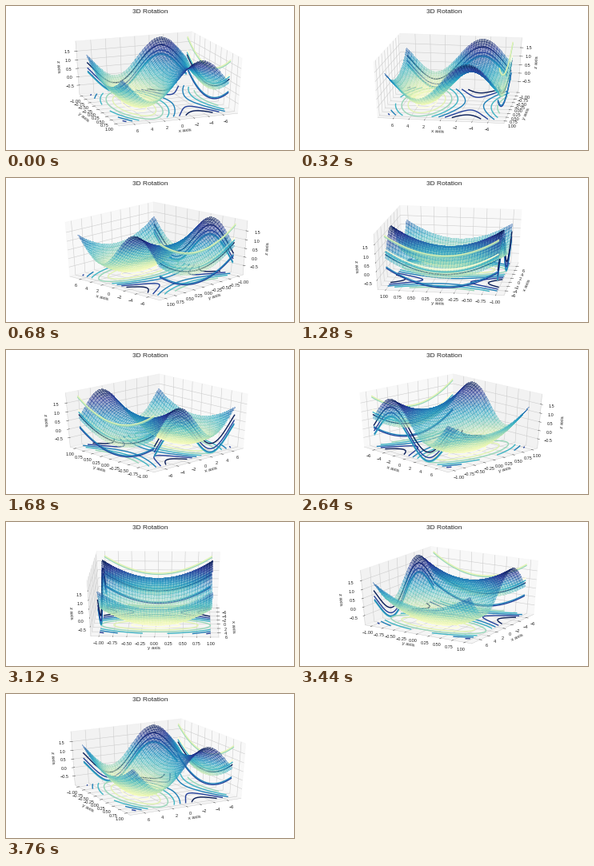
These frames come from a looping animation (360x180 px, 3.84 s). A matplotlib script:

```python
import math

import matplotlib.pyplot as plt
import numpy as np
from matplotlib.animation import FuncAnimation

DPI = 40
FRAMES = 96
STEP = 360 / FRAMES
START = 69.2
INK = "0.15"
CMAP = plt.get_cmap("YlGnBu")

plt.rcParams.update({
    "font.family": "Liberation Sans",
    "text.color": INK,
    "axes.labelcolor": INK,
    "axes.edgecolor": "0.8",
    "axes.labelsize": 11,
    "xtick.labelsize": 10,
    "ytick.labelsize": 10,
    "xtick.color": INK,
    "ytick.color": INK,
    "grid.color": "0.8",
    "grid.linewidth": 1,
})

fig = plt.figure(figsize=(360 / DPI, 180 / DPI), dpi=DPI)
fig.suptitle("3D Rotation", fontsize=15)
ax = fig.add_subplot(projection="3d")

# Let the cube stretch with the wide axes rectangle.
ax.apply_aspect = lambda position=None: None
ax.set_box_aspect((1, 1, 1), zoom=math.sqrt(3) / 1.8294640721620434)

X, Y = np.meshgrid(np.linspace(-7, 7, 85), np.linspace(-1, 1, 41))
Z = Y**2 - np.sin(X / 2)

# Without edges the translucent faces meet without visible seams.
ax.plot_surface(X, Y, Z, rcount=50, ccount=50, cmap=CMAP, alpha=0.4,
                edgecolor="none", antialiased=False)


def project(zdir, offset, levels, low):
    """Contour lines on one wall, one artist per level for depth sorting."""
    high = levels[-1]
    for level in levels:
        color = CMAP((level - low) / (high - low))
        ax.contour(X, Y, Z, levels=[level], zdir=zdir, offset=offset,
                   colors=[color], linewidths=2.5, linestyles="solid")


project("z", -1, np.linspace(-0.8, 1.6, 7), -0.8)
project("x", -7, np.linspace(-6, 6, 7), -6)
# Levels of opposite sign coincide on this wall.
project("y", -1, np.linspace(0, 0.75, 4), -0.75)


def padded(low, high):
    pad = (high - low) / 48
    return low - pad, high + pad


ax.set_xlim(*padded(-7.7, 7.7))
ax.set_ylim(*padded(-1.1, 1.1))
ax.set_zlim(*padded(-1, 2))
ax.set_xticks(np.arange(-6, 7, 2))
ax.set_yticks(np.linspace(-1, 1, 9))
ax.set_zticks(np.linspace(-0.5, 1.5, 5))
ax.set_xlabel("x axis")
ax.set_ylabel("y axis")
ax.set_zlabel("z axis")


def update(n):
    # The final pose is held for two frames.
    ax.view_init(elev=30, azim=START + STEP * min(n, FRAMES - 2))
    return []


anim = FuncAnimation(fig, update, frames=FRAMES, interval=40,
                     init_func=lambda: [], repeat=True, repeat_delay=0)

plt.show()
```
